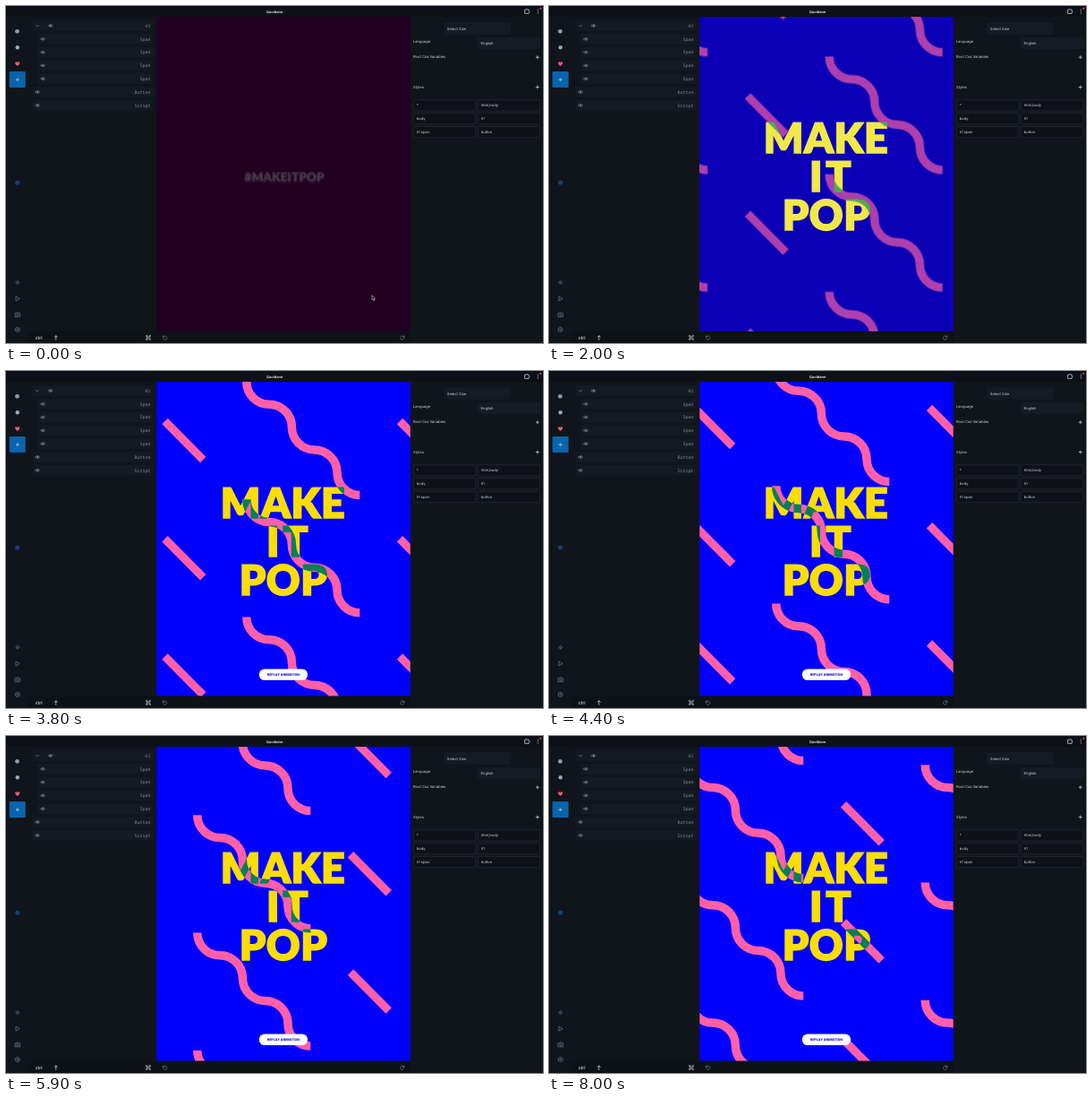
Write an HTML page that moves like this. It is 600 by 376 pixels and loops after 8.1 s.

```html
<!DOCTYPE html>
<html lang="en">
<head>
<meta charset="utf-8">
<title>Make it pop</title>
<style>
html, body { margin: 0; width: 100%; height: 100%; overflow: hidden; background: #10151c; }
svg { display: block; width: 100vw; height: 100vh; }
text { font-family: Inter, "Open Sans", sans-serif; font-size: 4.1px; fill: #cdd2d8; text-rendering: geometricPrecision; }
.title { font-weight: 600; font-size: 4px; fill: #eee; text-anchor: middle; }
.tag { font-family: "Noto Sans Mono", monospace; font-size: 5px; fill: #7f8791; text-anchor: end; }
.key { font-size: 5px; font-weight: 500; fill: #e0e4e9; }
.row { fill: #151a22; }
.box { fill: #161b23; }
.field { fill: #0e1218; stroke: #2a3038; stroke-width: .6; }
.line { fill: none; stroke: #c3c8cf; stroke-width: .8; stroke-linecap: round; stroke-linejoin: round; }
.dim { stroke: #666d77; }
.stage { isolation: isolate; }
.word, #ghost { font-family: Lato, "Open Sans", sans-serif; font-weight: 900; font-size: 46.5px; letter-spacing: .6px; text-anchor: middle; }
.word { fill: currentColor; stroke: currentColor; stroke-width: 1.5px; }
.wide { letter-spacing: 4px; }
#words { mix-blend-mode: difference; }
#ghost { fill: #4a4a55; filter: blur(4px); }
#cta text { font-weight: 800; font-size: 3.6px; fill: #1508d8; text-anchor: middle; }
</style>
</head>
<body>
<svg viewBox="0 0 600 376" preserveAspectRatio="none">
  <defs>
    <clipPath id="view"><rect x="168.3" y="12" width="283.4" height="350.5"/></clipPath>
    <g id="tile" fill="none" stroke="#ff60a8" stroke-width="9.5">
      <path d="M4.75 0a25.3 25.3 0 0 0 25.3 25.3a25.3 25.3 0 0 1 25.3 25.3a25.3 25.3 0 0 0 25.3 25.3a25.3 25.3 0 0 1 25.3 25.3a25.3 25.3 0 0 0 25.3 25.3"/>
      <path d="M176 44l42.7 43" stroke-width="9"/>
    </g>
    <g id="eye">
      <path class="line dim" stroke-width=".6" d="M-2.5 0Q0-3 2.5 0Q0 3-2.5 0z"/>
      <circle r=".9" fill="#9299a2"/>
    </g>
    <path id="plus" class="line" d="M-1.6 0h3.2M0-1.6v3.2"/>
  </defs>

  <rect width="600" height="376" fill="#10151c"/>
  <rect width="600" height="12" fill="#0d1117"/>
  <rect x="25" y="363" width="427" height="13" fill="#0d1118"/>
  <text class="title" x="300" y="7.5">Quoldane</text>

  <!-- left rail -->
  <circle cx="12.5" cy="28.3" r="2.4" fill="#959ba4"/>
  <circle cx="12.8" cy="46.3" r="2.2" fill="#a2a8b0"/>
  <path d="M12.8 67C9.4 64.4 10 62.2 11.4 62.2Q12.5 62.2 12.8 63.2Q13.1 62.2 14.2 62.2C15.6 62.2 16.2 64.4 12.8 67z" fill="#f4587a"/>
  <rect x="3.8" y="73" width="18" height="18" rx="1.2" fill="#0864ad"/>
  <use href="#plus" x="12.8" y="82.2"/>
  <circle cx="12.8" cy="197" r="2.6" fill="#183c80"/>
  <g fill="none" stroke="#858c95" stroke-width=".6" stroke-linejoin="round">
    <circle cx="12.8" cy="308.4" r="1.2"/>
    <circle cx="12.8" cy="308.4" r="2.2" stroke-dasharray=".5 1.23"/>
    <path d="M11 324l4.3 2.5l-4.3 2.5z"/>
    <path d="M10 342.8h1.5l.6-1h1.5l.6 1h1.5v4h-5.7z"/>
    <circle cx="12.8" cy="344.7" r="1.1"/>
    <path d="M12.8 358.3l2.4 1.4v2.7l-2.4 1.4l-2.4-1.4v-2.7z"/>
    <circle cx="12.8" cy="361" r=".9"/>
  </g>

  <g id="tree"></g>
  <path class="line dim" d="M33.5 21.3l1.6 1.7l1.6-1.7"/>

  <text class="key" x="32.7" y="371.8">ctrl</text>
  <path class="line" d="M55.8 372.5v-4.5m-1.5 1.5l1.5-1.7l1.5 1.7"/>
  <path class="line" style="stroke-width:.6" d="M157.9 368.9h2.2v2.2h-2.2zM157.9 368.9v-.8a.8.8 0 1 0-.8.8zM160.1 368.9v-.8a.8.8 0 1 1 .8.8zM157.9 371.1v.8a.8.8 0 1 1-.8-.8zM160.1 371.1v.8a.8.8 0 1 0 .8-.8z"/>
  <path class="line dim" d="M175.3 368v1.8h1.8M175.5 369.5a2.2 2.2 0 1 1 .6 2.3"/>
  <path class="line dim" d="M445 368v1.8h-1.8M444.8 369.5a2.2 2.2 0 1 0-.6 2.3"/>

  <!-- top right -->
  <path class="line" d="M580 4.2h1.3a.8.8 0 1 1 1.6 0h1.2v1.3a.8.8 0 1 1 0 1.6v1.3h-4.1z"/>
  <g fill="#d9dde2"><circle cx="594.3" cy="4" r=".6"/><circle cx="594.3" cy="6" r=".6"/><circle cx="594.3" cy="8" r=".6"/></g>
  <circle cx="597.3" cy="2.8" r="1" fill="#d8625a"/>

  <!-- right panel -->
  <rect class="box" x="489.5" y="18.3" width="74" height="13.2" rx="1"/>
  <text x="492.8" y="26.5">Select Size</text>
  <text x="455" y="40.5">Language</text>
  <rect class="box" x="527" y="35" width="70" height="13" rx="1"/>
  <text x="530.5" y="43">English</text>
  <text x="455" y="58.2">Root Css Variables</text>
  <use href="#plus" x="593.8" y="57.2"/>
  <text x="455" y="91.5">Styles</text>
  <use href="#plus" x="593.8" y="90.5"/>
  <g id="styles"></g>

  <g clip-path="url(#view)"><g class="stage">
    <rect id="back" x="168" y="12" width="284" height="351"/>
    <g id="pattern"></g>
    <text id="ghost">#MAKEITPOP</text>
    <g id="words">
      <text class="word">#</text>
      <text class="word">MAKE</text>
      <text class="word wide">IT</text>
      <text class="word">POP</text>
    </g>
    <g id="cta">
      <rect x="-27.2" y="-6.3" width="54.4" height="12.6" rx="6.3" fill="#fff"/>
      <text y="1.3">REPLAY ANIMATION</text>
    </g>
  </g></g>
  <path id="cursor" d="M409 322.8v5l1.1-.9l.8 1.8l.9-.4l-.8-1.7h1.5z" fill="#111" stroke="#ccc" stroke-width=".6"/>
</svg>
<script>
const LOOP = 8100, STEP = 100, TILE_W = 262.5, TILE_H = 131.25;
const $ = id => document.getElementById(id);

$('tree').innerHTML = ['H1', 'Span', 'Span', 'Span', 'Span', 'Button', 'Script'].map((name, i) => {
  const y = 22 + i * 14.8, span = name === 'Span';
  const left = span ? 35.5 : 29.5, eye = name === 'H1' ? 49.8 : span ? 41.3 : 35.3;
  return `<rect class="row" x="${left}" y="${y - 5.8}" width="${165 - left}" height="11.6" rx="1"/>` +
    `<use href="#eye" x="${eye}" y="${y}"/><text class="tag" x="161.5" y="${y + 1.8}">${name}</text>`;
}).join('');

$('styles').innerHTML = ['*', 'html,body', 'body', 'h1', 'h1 span', 'button'].map((name, i) => {
  const x = 455.3 + (i % 2) * 72, y = 104.8 + (i >> 1) * 14.8;
  return `<rect class="field" x="${x}" y="${y}" width="69.5" height="12.3" rx=".8"/>` +
    `<text x="${x + 3.5}" y="${y + 7.5}">${name}</text>`;
}).join('');

let tiles = '';
for (let x = -1; x < 2; x++)
  for (let y = -1; y < 4; y++) tiles += `<use href="#tile" x="${x * TILE_W}" y="${y * TILE_H}"/>`;
$('pattern').innerHTML = tiles;

// tracks of [time, value]
const drift = [[1900, 18], [2600, 0], [3800, -29], [5100, -61.5], [6700, -106.5], [8000, -140]];
const size = [[1300, .284], [1500, .367], [1600, .75], [1700, 1.137], [1800, 1.1], [2000, 1]];
const gap = [[900, 0], [1300, 17], [1500, 21.5], [1600, 48], [1700, 74], [1800, 62], [2000, 43.2]];
const stack = [[900, 0], [1500, .93], [1600, 1]];
const fade = [[0, .15], [500, 1]];
const blue = [[1800, 0], [2100, 1]];
const pop = [[2200, 0], [2400, .8], [2600, .972], [2700, 1]];

const mix = (a, b, k) => a + (b - a) * k;
function at(track, t) {
  const i = track.findIndex(p => p[0] > t);
  if (i < 0) return track[track.length - 1][1];
  if (!i) return track[0][1];
  const [t0, a] = track[i - 1], [t1, b] = track[i];
  return mix(a, b, (t - t0) / (t1 - t0));
}
const rgb = (a, b, k) => `rgb(${a.map((v, i) => Math.round(mix(v, b[i], k)))})`;
const wrap = (v, n) => ((v % n) + n) % n;
const place = (el, x, y, s = 1) => el.setAttribute('transform', `translate(${x} ${y}) scale(${s})`);

// inline x, stacked x offset, line
const layout = [[270, -39, -1], [294.3, -.3, -1], [321.3, 6.5, 0], [341.5, .3, 1]];
const words = [...document.querySelectorAll('.word')];

function draw(t) {
  const k = at(stack, t), s = at(size, t), g = at(gap, t), b = at(blue, t), d = at(drift, t);
  words.forEach((w, i) => {
    const [x, off, line] = layout[i];
    place(w, i ? mix(x, 309.8 + off * s, k) : x, 190.2 + line * g + 16.8 * s, s);
  });
  words[0].style.opacity = 1 - Math.min(1, k * 1.1);
  const alpha = at(fade, t);
  $('words').style.opacity = alpha;
  $('words').style.color = rgb([255, 255, 255], [250, 222, 255], b);
  $('ghost').style.opacity = (1 - alpha) * .6;
  place($('ghost'), 311.5, 196.8, .284);
  $('back').style.fill = rgb([34, 0, 34], [0, 0, 255], b);
  $('pattern').style.opacity = b;
  place($('pattern'), 168 + wrap(125 + d, TILE_W), 12 + wrap(29 + d, TILE_H));
  place($('cta'), 309.9, 338.8, at(pop, t));
  $('cursor').style.display = t < 300 ? '' : 'none';
}

const start = performance.now();
function tick() {
  const t = (performance.now() - start) % LOOP;
  draw(Math.floor(t / STEP + .01) * STEP % LOOP);
  requestAnimationFrame(tick);
}
draw(0);
requestAnimationFrame(tick);
</script>
</body>
</html>
```
